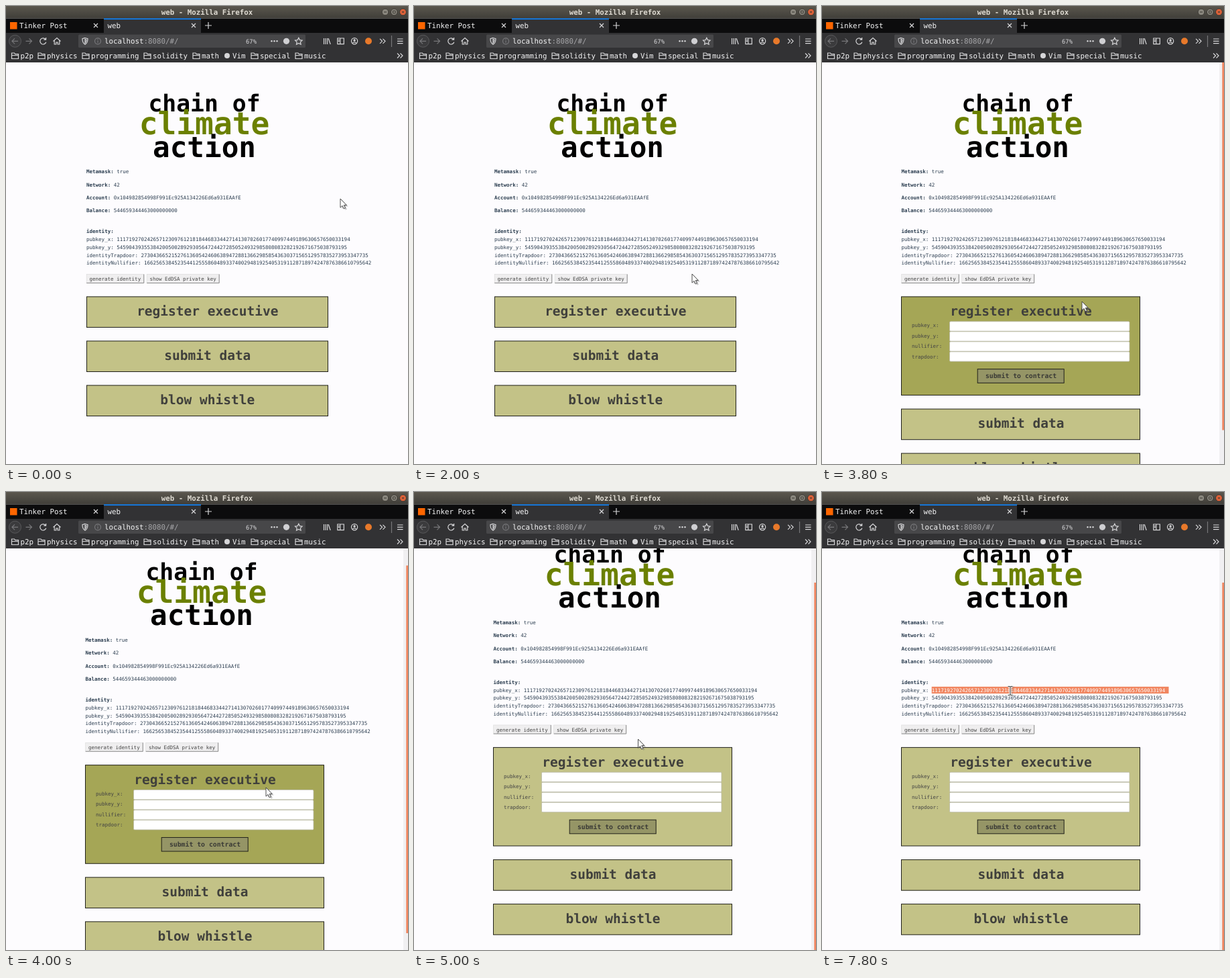
An HTML page that plays this animation: 600 by 682 pixels, repeating every 8000 ms.

```html
<!DOCTYPE html>
<html lang="en">
<head>
<meta charset="utf-8">
<title>web</title>
<style>
html, body { margin: 0; width: 100%; height: 100%; overflow: hidden; background: #fdfcfe; }
svg { display: block; width: 600px; height: 682px; }
text { font-family: "DejaVu Sans Mono", monospace; text-rendering: geometricPrecision; white-space: pre; }
.bold { font-weight: bold; }
.mid { text-anchor: middle; }
.ui { font-size: 10.8px; fill: #f4f4f5; }
.small { font-size: 7.53px; fill: #2c3e50; }
.form { font-size: 7.5px; fill: #444; }
.head { font-size: 19.5px; font-weight: bold; fill: #40403c; text-anchor: middle; }
.icon { fill: none; stroke: #d6d6d8; stroke-width: 1.2; }
.dim { stroke: #77777a; }
.panel { stroke: #20201a; stroke-width: 1; }
</style>
</head>
<body>
<svg id="stage" viewBox="0 0 600 682"></svg>
<script>
const LOOP = 8000, STEP = 200;
const LIGHT = '#c3c287', DARK = '#a5a656', ACCENT = '#f18660';

const rect = (x, y, w, h, fill, extra = '') =>
  `<rect x="${x}" y="${y}" width="${w}" height="${h}" fill="${fill}" ${extra}/>`;
const text = (x, y, cls, body, extra = '') =>
  `<text x="${x}" y="${y}" class="${cls}" ${extra}>${body}</text>`;
const icon = (d, cls = '') => `<path class="icon ${cls}" d="${d}"/>`;
const dot = (x, y, r, fill, extra = '') => `<circle cx="${x}" cy="${y}" r="${r}" fill="${fill}" ${extra}/>`;
const cross = (x, y, r) => icon(`M${x - r} ${y - r}l${2 * r} ${2 * r}m0 ${-2 * r}l${-2 * r} ${2 * r}`);
const chevrons = (x, y) => icon(`M${x - 4} ${y - 3.5}l3.5 3.5l-3.5 3.5m4.5 -7l3.5 3.5l-3.5 3.5`);
const folder = x => icon(`M${x + .5} 78.5v-8.5h4l1.2 1.6h4.8v6.9zm0 -5h10`);

function chrome() {
  const bookmarks = [[8, 'p2p'], [47.5, 'physics'], [113.5, 'programming'], [205.5, 'solidity'],
    [278.5, 'math'], [324.5, 'Vim'], [365.5, 'special'], [431.5, 'music']];
  const controls = [[566, '#8a877e', 'M564 9h4'], [579.3, '#8a877e', 'M577.5 7.2h3.6v3.6h-3.6z'],
    [592.5, '#e9653a', 'M590.7 7.2l3.6 3.6m0 -3.6l-3.6 3.6']];
  return `<defs><linearGradient id="bar" x2="0" y2="1">
      <stop stop-color="#5b574e"/><stop offset="1" stop-color="#403e39"/></linearGradient></defs>`
    + rect(0, 0, 600, 18.5, 'url(#bar)')
    + text(300, 12.8, 'ui bold mid', 'web - Mozilla Firefox', 'style="fill:#dfdbd2"')
    + controls.map(([x, fill, d]) => dot(x, 9, 4.8, fill, 'stroke="#35332e" stroke-width=".8"')
      + `<path d="${d}" fill="none" stroke="#3b3831"/>`).join('')
    + rect(0, 18.5, 600, 21.5, '#0c0c0d')
    + rect(146, 18.5, 145, 22, '#323234') + rect(146, 18.5, 145, 1.6, '#0a84ff')
    + rect(6, 24, 10.5, 10.5, '#f60')
    + text(20, 33, 'ui', 'Tinker Post') + text(151.5, 33, 'ui', 'web')
    + cross(134, 29, 3) + cross(280, 29, 3) + icon('M297 29h10m-5 -5v10')
    + rect(0, 40, 600, 44, '#323234')
    + rect(108, 42.5, 339, 19.5, '#474749', 'rx="1.5"')
    + dot(13.5, 52.3, 9, '#3b3b3d', 'stroke="#59595b"')
    + icon('M18 52.3h-9m4 -4l-4 4l4 4', 'dim') + icon('M29.5 52.3h9m-4 -4l4 4l-4 4', 'dim')
    + icon('M59 49.5a4.6 4.6 0 1 0 .8 4.3m-.2 -6.8v3.2h-3.2')
    + icon('M70.5 52.5l5.5 -5l5.5 5m-9.3 -1v5.5h2.6v-3h2.4v3h2.6v-5.5')
    + icon('M118 47.5l4 1.3c0 4 -.8 6.8 -4 8.5c-3.200 -1.700 -4 -4.500 -4 -8.500z')
    + icon('M118 49.5v5.800c1.500 -1.300 2 -3 2 -5z')
    + icon('M132.500 52.300a4.500 4.500 0 1 0 9 0a4.500 4.500 0 1 0 -9 0m4.500 -.5v3m0 -5.200v1.200', 'dim')
    + text(147, 56.4, 'ui', 'localhost<tspan fill="#a5a5a8">:8080/#/</tspan>')
    + text(366, 55.6, 'mid', '67%', 'font-size="8.800" fill="#dadadc"')
    + [396.5, 400.5, 404.5].map(x => dot(x, 52.3, 1.2, '#d6d6d8')).join('')
    + dot(418.5, 52.3, 4.6, '#cfcfd2')
    + icon('M436.800 47.300l1.600 3.300l3.700 .5l-2.700 2.500l.7 3.600l-3.300 -1.700l-3.300 1.700l.7 -3.600l-2.700 -2.500l3.700 -.5z')
    + icon('M474.500 48v9m2.600 -9v9m2.600 -9v9m1.500 -8.700l3 8.700')
    + icon('M494.800 48h9.500v8.700h-9.500zm4 0v8.700m-3 -6h2m-2 2h2')
    + icon('M515.500 52.300a4.600 4.600 0 1 0 9.200 0a4.600 4.600 0 1 0 -9.200 0m1.800 3c1 -2 4.600 -2 5.600 0')
    + dot(520.1, 51, 1.7, '#d6d6d8')
    + dot(541, 52.3, 5, '#e8792a')
    + chevrons(562, 52.3) + icon('M575.500 44v17', 'dim')
    + icon('M584 49h8.500m-8.500 3.300h8.500m-8.500 3.300h8.500')
    + bookmarks.map(([x, name]) => (name === 'Vim' ? dot(330, 74, 4, '#d6d6d8') : folder(x))
      + text(x + 13.4, 77.8, 'ui', name)).join('')
    + chevrons(588, 74);
}

const PUBKEY_X = '11171927024265712309761218184468334427141307026017740997449189630657650033194';

function details() {
  const bold = s => `<tspan class="bold">${s}</tspan>`;
  const rows = [
    [249, bold('Metamask:') + ' true'],
    [268.5, bold('Network:') + ' 42'],
    [288, bold('Account:') + ' 0x104982854998F991Ec925A134226Ed6a931EAAfE'],
    [307.3, bold('Balance:') + ' 544659344463000000000'],
    [338.4, bold('identity:')],
    [350.2, `pubkey_x: <tspan id="key">${PUBKEY_X}</tspan>`],
    [361.8, 'pubkey_y: 5459043935538420050028929305647244272850524932985808083282192671675038793195'],
    [373.5, 'identityTrapdoor: 273043665215276136054246063894728813662985854363037156512957835273953347735'],
    [385.1, 'identityNullifier: 166256538452354412555860489337400294819254053191128718974247876386610795642']];
  const button = (x, w, label) => rect(x, 399.5, w, 13, '#efeeef', 'stroke="#dcdcdc" stroke-width=".7"')
    + `<path d="M${x} 412.500h${w}v-13" fill="none" stroke="#8c8c8c"/>`
    + text(x + 4.2, 409, 'form', label);
  return rect(165.2, 342.4, 0, 10.2, ACCENT, 'id="selection"')
    + rows.map(([y, body]) => text(120, y, 'small', body)).join('')
    + button(120.2, 85.6, 'generate identity') + button(210.2, 108, 'show EdDSA private key');
}

function form() {
  return ['pubkey_x:', 'pubkey_y:', 'nullifier:', 'trapdoor:'].map((label, i) =>
    text(134, 478 + i * 15.5, 'form', label)
    + rect(190.5, 469.8 + i * 15, 268.5, 14.4, '#fff', 'rx="1.5" stroke="#b9b9a8" stroke-width=".8"')).join('')
    + rect(232.2, 540.7, 129, 20.6, '#959566', 'class="panel"')
    + text(297, 554.4, 'bold mid', 'submit to contract', 'font-size="9.800" fill="#3a3a36"');
}

const panel = (id, y, label) => `<g id="${id}">${rect(120.5, y, 360, 45.6, LIGHT, 'class="panel"')}
  ${text(300.8, y + 28.1, 'head', label)}</g>`;

const stage = document.getElementById('stage');
stage.innerHTML = rect(0, 0, 600, 682, '#fdfcfe')
  + `<g id="page"><g id="logo" class="bold mid">
      ${text(296, 157, '', 'chain of', 'font-size="34.700"')}
      ${text(296, 191, '', 'climate', 'font-size="46.200" fill="#6b8000"')}
      ${text(296, 224.5, '', 'action', 'font-size="42.600"')}</g>
    <g id="details">${details()}</g>
    ${panel('register', 432.9, 'register executive')}<g id="form">${form()}</g>
    ${panel('submit', 498.9, 'submit data')}${panel('whistle', 564.9, 'blow whistle')}</g>
    <g id="scrollbar">${rect(593, 84, 7, 598, '#f1f0f2')}${rect(597.3, 84, 2.7, 547.5, ACCENT, 'id="thumb"')}</g>`
  + chrome()
  + `<g id="arrow"><path d="M0 0V13.200L3.100 10.400L5.200 15L7.400 14L5.300 9.600H9.300Z" fill="#777" opacity=".4" transform="translate(2.500 1.800)"/>
      <path d="M0 0V13.200L3.100 10.400L5.200 15L7.400 14L5.300 9.600H9.300Z" fill="#fff" stroke="#3a3a3a" stroke-width=".9"/></g>
    <g id="beam" fill="none"><path d="M-1 -5.500h7M2.500 -5v12M-1 7h7" stroke="#777" stroke-width="2" opacity=".35"/>
      <path d="M-3.500 -6.500h7M0 -6.500v13M-3.500 6.500h7" stroke="#fff" stroke-width="3"/>
      <path d="M-3.500 -6.500h2.700l.8 .7l.8 -.7h2.700M0 -6v12M-3.500 6.500h2.700l.8 -.7l.8 .7h2.700" stroke="#333"/></g>`;

const $ = id => document.getElementById(id);
const move = (id, x, y) => $(id).setAttribute('transform', `translate(${x} ${y})`);
const show = (id, on) => { $(id).style.display = on ? '' : 'none'; };

const POINTER = [[0, 499, 287], [400, 499, 287], [1800, 415, 399], [2200, 415, 399],
  [2800, 388, 440], [4400, 388, 440], [5600, 281, 296], [LOOP, 281, 296]];
const SCROLL = [[0, 0], [3800, 0], [4200, 52.5], [LOOP, 52.5]];

// Eased interpolation in a table of [time, ...values].
function sample(table, t) {
  const i = table.findIndex(row => row[0] > t);
  const [a, b] = [table[i - 1], table[i]];
  const p = (t - a[0]) / (b[0] - a[0]), e = p * p * (3 - 2 * p);
  return a.slice(1).map((v, k) => v + (b[k + 1] - v) * e);
}

function draw(t) {
  const [x, y] = sample(POINTER, t), [scroll] = sample(SCROLL, t);
  const open = t >= 3600, pageY = y + scroll;

  move('page', 0, -scroll);
  move('logo', open ? -4 : 0, 0);
  move('details', open ? -1.5 : 0, 0);
  show('form', open);
  show('scrollbar', open);
  $('thumb').setAttribute('y', 84 + scroll * .97);

  for (const id of ['register', 'submit', 'whistle']) {
    const box = $(id).firstElementChild;
    box.setAttribute('x', open ? 118.5 : 120.5);
    box.setAttribute('width', open ? 356 : 360);
    $(id).querySelector('text').setAttribute('x', open ? 297 : 300.8);
    if (id !== 'register') move(id, 0, open ? 101.2 : 0);
  }
  const register = $('register').firstElementChild, height = open ? 146.6 : 45.6;
  register.setAttribute('height', height);
  register.setAttribute('fill', pageY > 433 && pageY < 433 + height ? DARK : LIGHT);

  const selected = t >= 6000;
  $('selection').setAttribute('width', t >= 6200 ? 353.8 : selected ? 349.2 : 0);
  $('key').setAttribute('fill', selected ? '#fff' : '#2c3e50');
  $('key').style.fill = selected ? '#fff' : '';

  const overText = (pageY > 330 && pageY < 388) || (open && pageY > 469 && pageY < 530);
  show('beam', overText);
  show('arrow', !overText);
  move('beam', x, y);
  move('arrow', x, y);
}

const start = performance.now();
function tick() {
  const t = (performance.now() - start) % LOOP;
  draw(Math.floor(t / STEP) * STEP);
  requestAnimationFrame(tick);
}
tick();
</script>
</body>
</html>
```
